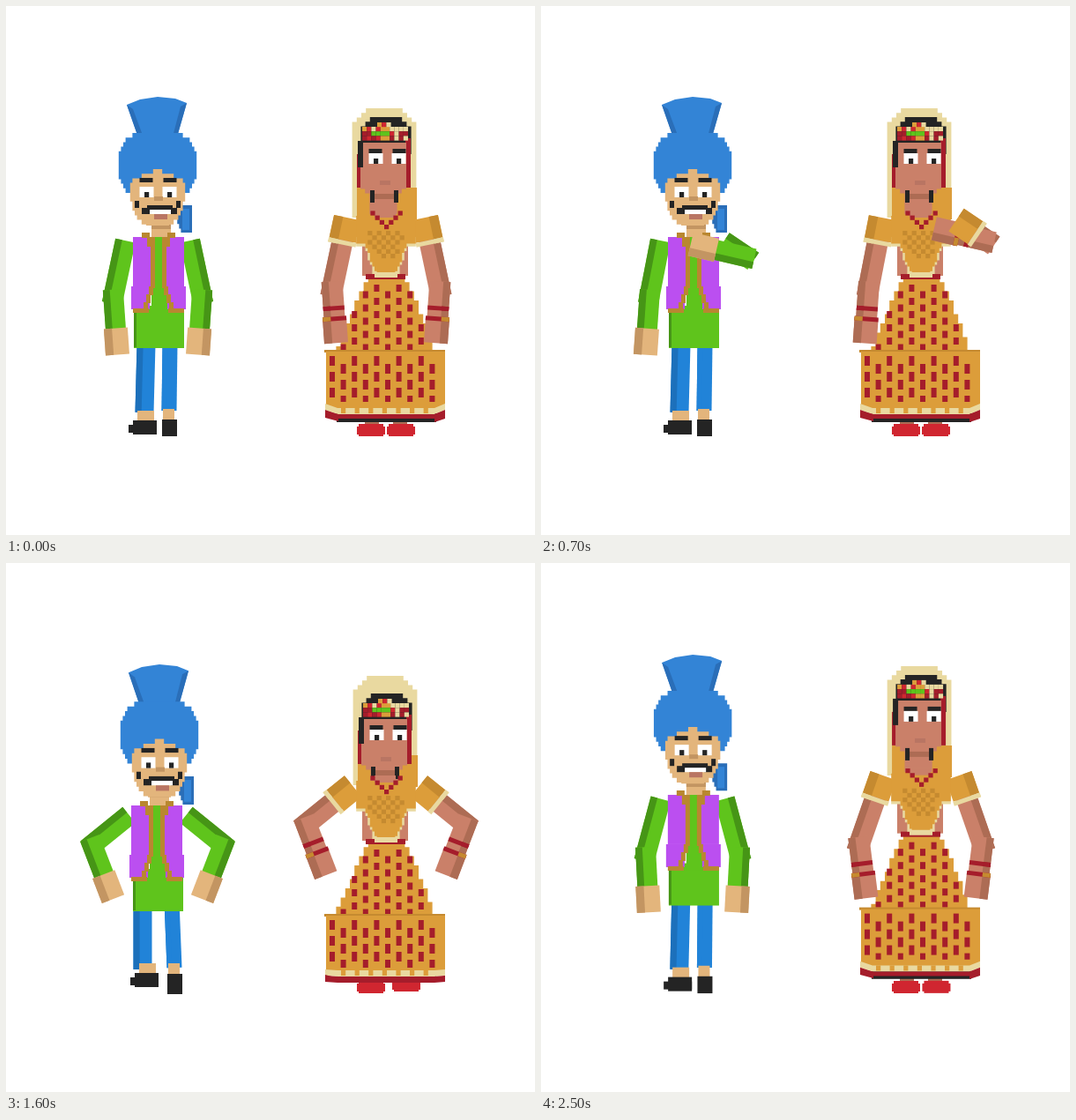
These frames come from a looping animation (600 by 600 pixels, 2.6 s). An HTML page with a canvas:

```html
<!DOCTYPE html>
<html lang="en">
<head>
<meta charset="utf-8">
<title>Dancing couple</title>
<style>
html, body { margin: 0; width: 100%; height: 100%; overflow: hidden; background: #fff; }
canvas { display: block; width: 100%; height: 100%; }
</style>
</head>
<body>
<canvas id="stage" width="600" height="600"></canvas>
<script>
const g = document.getElementById('stage').getContext('2d');
const LOOP = 2600, STEP = 100, PX = 5.2;

const C = {
  blue: '#3384d6', blueDark: '#2a6eb8', leg: '#2183d8', legDark: '#1c70bb',
  green: '#5fc41c', greenDark: '#469516', purple: '#bb4ff0', gold: '#b98730',
  skin: '#e3b57c', skinDark: '#c39562', tan: '#ca8069', tanDark: '#ad6c54',
  silk: '#dc9d3a', silkDark: '#c58a30', cream: '#e9d9a0', red: '#a51d2b',
  shoe: '#d02630', ink: '#242424', white: '#fff', lip: '#b97563'
};

const mix = (a, b, f) => a + (b - a) * f;
const clamp = (v, lo = 0, hi = 1) => Math.min(hi, Math.max(lo, v));
const ramp = (t, a, b) => {
  const f = clamp((t - a) / (b - a));
  return f * f * (3 - 2 * f);
};

// ---- Drawing helpers ----

function box(color, x0, y0, x1, y1) {
  g.fillStyle = C[color];
  g.fillRect(x0, y0, x1 - x0, y1 - y0);
}

// The same box on both sides of a centre line
function pair(color, cx, near, y0, far, y1) {
  box(color, cx - far, y0, cx - near, y1);
  box(color, cx + near, y0, cx + far, y1);
}

function poly(color, ...p) {
  g.fillStyle = C[color];
  g.beginPath();
  for (let i = 0; i < p.length; i += 2) g.lineTo(p[i], p[i + 1]);
  g.closePath();
  g.fill();
}

// A blocky outline: rows of pixels, edges given as functions of y
function rows(color, y0, y1, left, right) {
  g.fillStyle = C[color];
  g.beginPath();
  for (let y = y0; y < y1 - 0.1; y += PX) {
    const l = left(y), h = Math.min(PX + 0.4, y1 - y);
    g.rect(l, y, right(y) - l, h);
  }
  g.fill();
}

function blob(color, cx, y0, y1, half) {
  const snap = y => Math.round(half(y) / PX * 2) * PX / 2;
  rows(color, y0, y1, y => cx - snap(y), y => cx + snap(y));
}

function shifted(x, y, draw, sy = 1) {
  g.save();
  g.translate(x, y);
  g.scale(1, sy);
  draw();
  g.restore();
}

// A box seen at an angle: lit front and a darker outer side
function limb([x0, y0], [x1, y1], w, front, side, out, pad0 = 0, pad1 = 0) {
  g.save();
  g.translate(x0, y0);
  g.rotate(Math.atan2(y1 - y0, x1 - x0));
  const len = Math.hypot(x1 - x0, y1 - y0) + pad1;
  box(front, -pad0, -w / 2, len, w / 2);
  box(side, -pad0, out * w * 0.16, len, out * w / 2);
  g.restore();
}

// ---- Dance ----

// Upper arm and forearm angles from straight down (outwards is positive), upper arm length
const poses = {
  down: () => [12, -4, 1],
  aside: () => [11, 4, 1],
  chest: () => [56, -103, 0.48],
  wide: () => [90, 76, 0.6],
  bent: flare => [74 + flare, 4 + flare * 1.6, 0.86 + flare / 90],
  hips: () => [51, -21, 0.82],
  rest: flare => [15 + flare * 0.3, -3 - flare * 0.3, 1]
};

const dance = cross => [
  [0, 'down'], [400, cross], [1000, cross], [1300, 'wide'], [1400, 'bent'],
  [1600, 'hips'], [2200, 'hips'], [2500, 'rest'], [LOOP, 'down']
];

const man = { cx: 172, reach: 37, shoulder: 268, sink: 19, upper: 63, fore: 66, flare: 0 };
const woman = { cx: 431, reach: 45, shoulder: 246, sink: 11, upper: 76, fore: 62, flare: 14 };

const crouch = t => ramp(t, 1150, 1400) - ramp(t, 2000, LOOP);
const nod = t => 10 * Math.exp(-(((t - 1600) / 150) ** 2));

function armPose(p, t, side) {
  const keys = dance(side < 0 ? 'aside' : 'chest');
  const i = keys.findIndex(key => t < key[0]);
  const [t0, a] = keys[i - 1], [t1, b] = keys[i];
  const to = poses[b](p.flare);
  return poses[a](p.flare).map((v, n) => mix(v, to[n], (t - t0) / (t1 - t0)));
}

// Joints of one arm; side is -1 for left, 1 for right
function arm(p, t, side) {
  const [up, low, size] = armPose(p, t, side);
  const k = crouch(t);
  const step = ([x, y], deg, len) => {
    const a = deg * Math.PI / 180;
    return [x + side * Math.sin(a) * len, y + Math.cos(a) * len];
  };
  const shoulder = [p.cx + side * (p.reach - 3 * k), p.shoulder + p.sink * k];
  const elbow = step(shoulder, up, p.upper * size);
  return {
    shoulder, elbow, out: -side,
    along: f => step(shoulder, up, f),
    lower: f => step(elbow, low, f),
    crossed: low < -40
  };
}

function manArm(a) {
  const wrist = a.lower(man.fore - 30);
  limb(a.shoulder, a.elbow, 23, 'green', 'greenDark', a.out, 2, 8);
  limb(a.elbow, wrist, 23, 'green', 'greenDark', a.out, 8, 3);
  limb(wrist, a.lower(man.fore), 27, 'skin', 'skinDark', a.out);
}

function womanArm(a) {
  const l = a.lower;
  limb(a.shoulder, a.elbow, 24, 'tan', 'tanDark', a.out, 0, 9);
  limb(a.elbow, l(33), 24, 'tan', 'tanDark', a.out, 8);
  limb(l(33), l(woman.fore), 27, 'tan', 'tanDark', a.out);
  limb(l(20), l(25), 24, 'red', 'red', a.out);
  limb(l(32), l(37), 27, 'red', 'silkDark', a.out);
  limb(a.shoulder, a.along(20), 31, 'silk', 'silkDark', a.out, 6);
  limb(a.along(20), a.along(25), 32, 'cream', 'cream', a.out);
}

// Eyes and brows shared by both faces; pupils sit a little left
function eyes(cx, brow, y) {
  pair('ink', cx, 6, brow, 21, brow + 5);
  pair('white', cx, 5, y, 21, y + 12);
  for (const x of [cx - 15.5, cx + 10.5]) box('ink', x, y + 6, x + PX, y + 12);
}

// ---- Man ----

function manLegs(k) {
  limb([159 - 4 * k, 384], [157 - 2 * k, 461], 21, 'leg', 'legDark', 1);
  limb([186 + 2 * k, 384], [185 + 6 * k, 459], 17, 'leg', 'leg', 1);
  shifted(2 * k, -5 * k, () => {
    box('skin', 149, 459, 168, 471);
    box('ink', 144, 470, 171, 486);
    box('ink', 139, 475, 171, 484);
  });
  shifted(6 * k, -3 * k, () => {
    box('skin', 178, 457, 191, 470);
    box('ink', 177, 469, 194, 488 + 4 * k);
  });
}

function manTorso(k) {
  shifted(-k, 7 * k, () => {
    box('green', 145, 340, 202, 388);
    box('greenDark', 145, 347, 148, 387);
  });
  shifted(-2 * k, 13 * k, () => {
    const cx = 173;
    box('skin', 165, 244, 187, 262);
    box('skinDark', 165, 248, 187, 253);
    box('green', 165, 262, 184, 348);
    pair('purple', cx, 7, 262, 29, 318);
    pair('purple', cx, 10, 318, 31, 344);
    pair('gold', cx, 10, 257, 19, 263);
    pair('gold', cx, 4, 262, 13, 273);
    pair('gold', cx, 4, 272, 9, 320);
    for (let i = 0; i < 3; i++) pair('gold', cx, 6 + 3 * i, 318 + 9 * i, 11 + 3 * i, 328 + 9 * i);
    pair('gold', cx, 11, 343, 29, 348);
  });
}

function manHead(k) {
  const cx = 172, sy = 1 + 0.032 * k;
  shifted(2 * k, 12 * k + 104 * (1 - sy), () => {
    rows('blueDark', 226, 257, y => 188 + (y - 226) * 0.4, () => 211);
    box('blue', 200, 230, 208, 254);

    poly('blue', 137, 112, 152, 106, 172, 103, 192, 105, 205, 110, 193, 152, 151, 152);
    poly('blueDark', 137, 112, 144, 117, 157, 152, 151, 152);
    poly('blueDark', 205, 110, 198, 114, 188, 152, 193, 152);
    blob('blue', cx, 144, 215, y => 44 * Math.cbrt(1 - Math.abs((y + 2.6 - 180) / 37) ** 3));

    // Forehead opens like a gable under the turban, the jaw closes in
    blob('skin', cx, 185, 249, y => Math.min(6 + (y - 185) * 2.1, 31 - 15 * ((y - 185) / 60) ** 4));
    eyes(cx + 0.5, 195, 205);
    box('skinDark', 168, 216, 178, 221);
    pair('ink', cx, 21, 221, 26, 229);
    pair('ink', cx + 2, 11, 229, 20, 236);
    box('ink', 160, 226, 189, 232);
    box('white', 163, 231, 187, 236);
    box('lip', 168, 236, 183, 242);
  }, sy);
}

// ---- Woman ----

function womanSkirt(k) {
  const waist = 308 + 9 * k, knee = 390 + 8 * k, hem = 451 + 10 * k, dip = 5 - 4 * k;
  const down = y => clamp((y - waist) / (knee - waist));
  const left = y => Math.round(mix(409, 373, down(y)) / PX) * PX;
  const right = y => Math.round(mix(453, 486, down(y) ** 0.8) / PX) * PX;

  pair('tanDark', 431, 8, 464, 24, 476);
  for (const side of [-1, 1]) {
    shifted(431 + side * 17 + (side > 0 ? 6 * k : 0), side > 0 ? -2 * k : 0, () => {
      box('shoe', -14, 474, 14, 488);
      box('shoe', -16, 477, 16, 486);
    });
  }
  box('ink', 375, 460, 488, 472 - 3 * k);

  rows('silk', waist, knee + 4, left, right);
  dashes(waist + 8, knee, 8, left, right);
  box('silkDark', 361, knee, 498, knee + 3);
  box('silk', 363, knee + 2, 498, hem + dip + 1);
  dashes(knee + 7, hem - 2, 11, () => 362, () => 497);

  // Bands bulge down at the front
  const band = (color, y, h) => poly(color, 362, y, 376, y + dip, 486, y + dip, 498, y,
    498, y + h, 486, y + dip + h, 376, y + dip + h, 362, y + h);
  band('cream', hem, 7);
  for (let x = 380; x < 486; x += 3 * PX) box('silk', x, hem + dip, x + PX, hem + dip + 6);
  band('red', hem + 7, 5 + 2 * k);
  poly('red', 362, hem + 8, 377, hem + 12, 377, 471, 362, 467);
  poly('red', 498, hem + 8, 486, hem + 12, 486, 472, 498, 468);
}

// Brick pattern of upright dashes
function dashes(y0, y1, h, left, right) {
  for (let col = 0; col < 11; col++) {
    const x = 367 + col * 12.6;
    for (let y = y0 + (col % 2) * (h + 7) / 2; y < y1; y += h + 7)
      if (x > left(y) + 1 && x + 6 < right(y)) box('red', x, y, x + 6, Math.min(y + h, y1));
  }
}

function jewels(x0, y0, cols, lines) {
  const colors = ['red', 'shoe', 'cream', 'green', 'silk'];
  let seed = 11;
  for (let i = 0; i < cols * lines; i++) {
    seed = (seed * 73 + 41) % 997;
    const x = x0 + (i % cols) * PX, y = y0 + Math.floor(i / cols) * PX;
    box(colors[seed % colors.length], x, y, x + PX, y + PX);
  }
}

function womanHead(t) {
  const k = crouch(t), cx = 429;
  shifted(k, 12 * k, () => {
    blob('cream', cx, 116, 240, y => Math.min(37, 20 + (y - 116)));
    rows('silk', 206, 242, () => 398, () => 466);
    shifted(0, nod(t), () => {
      blob('ink', cx + 2, 126, 168, y => Math.min(28, 19 + (y - 126)));
      box('red', 398, 168, 404, 206);
      box('red', 453, 150, 459, 206);
      blob('tan', cx - 1, 155, 236, y => 26 - 5 * clamp(Math.floor((y - 199) / 6), 0, 2));
      box('tanDark', 415, 213, 441, 219);
      pair('ink', cx, 11, 209, 16, 223);
      jewels(404, 137, 10, 3);
      box('ink', 399, 153, 405, 183);
      jewels(421, 132, 3, 1);
      eyes(432.5, 162, 167);
      box('lip', 424, 198, 436, 203);
    });
  });
}

function bodice(k) {
  const cx = 431;
  const taper = low => y => y < 266 + low ? 33 : 24 - (y - 266 - low) * 0.36;
  shifted(0, 9 * k, () => {
    box('tan', 404, 268, 456, 306);
    box('red', 408, 304, 453, 310);
    blob('cream', cx, 262, 308, taper(6));
    blob('silk', cx, 238, 302, taper(0));
    for (let r = 0; r < 6; r++)
      for (let c = r % 2 - 4; c < 4; c += 2)
        if (Math.abs(c + 0.5) < 5 - r / 2) box('silkDark', cx + c * PX, 255 + r * PX, cx + (c + 1) * PX, 255 + (r + 1) * PX);
    box('tan', 418, 232, 442, 240);
    for (let i = -3; i <= 3; i++) {
      const x = cx + i * PX - 2, y = 248 - Math.abs(i) * PX;
      box('red', x, y, x + PX, y + PX);
    }
  });
}

// ---- Stage ----

function draw(t) {
  const k = crouch(t);
  g.clearRect(0, 0, 600, 600);

  const manRight = arm(man, t, 1);
  manLegs(k);
  manArm(arm(man, t, -1));
  if (!manRight.crossed) manArm(manRight);
  manTorso(k);
  manHead(k);
  if (manRight.crossed) manArm(manRight);

  const womanRight = arm(woman, t, 1);
  womanSkirt(k);
  womanHead(t);
  womanArm(arm(woman, t, -1));
  if (!womanRight.crossed) womanArm(womanRight);
  bodice(k);
  if (womanRight.crossed) womanArm(womanRight);
}

const start = performance.now();
function tick() {
  const t = Math.max(0, performance.now() - start) % LOOP;
  draw(Math.floor(t / STEP) * STEP);
  requestAnimationFrame(tick);
}
tick();
</script>
</body>
</html>
```
